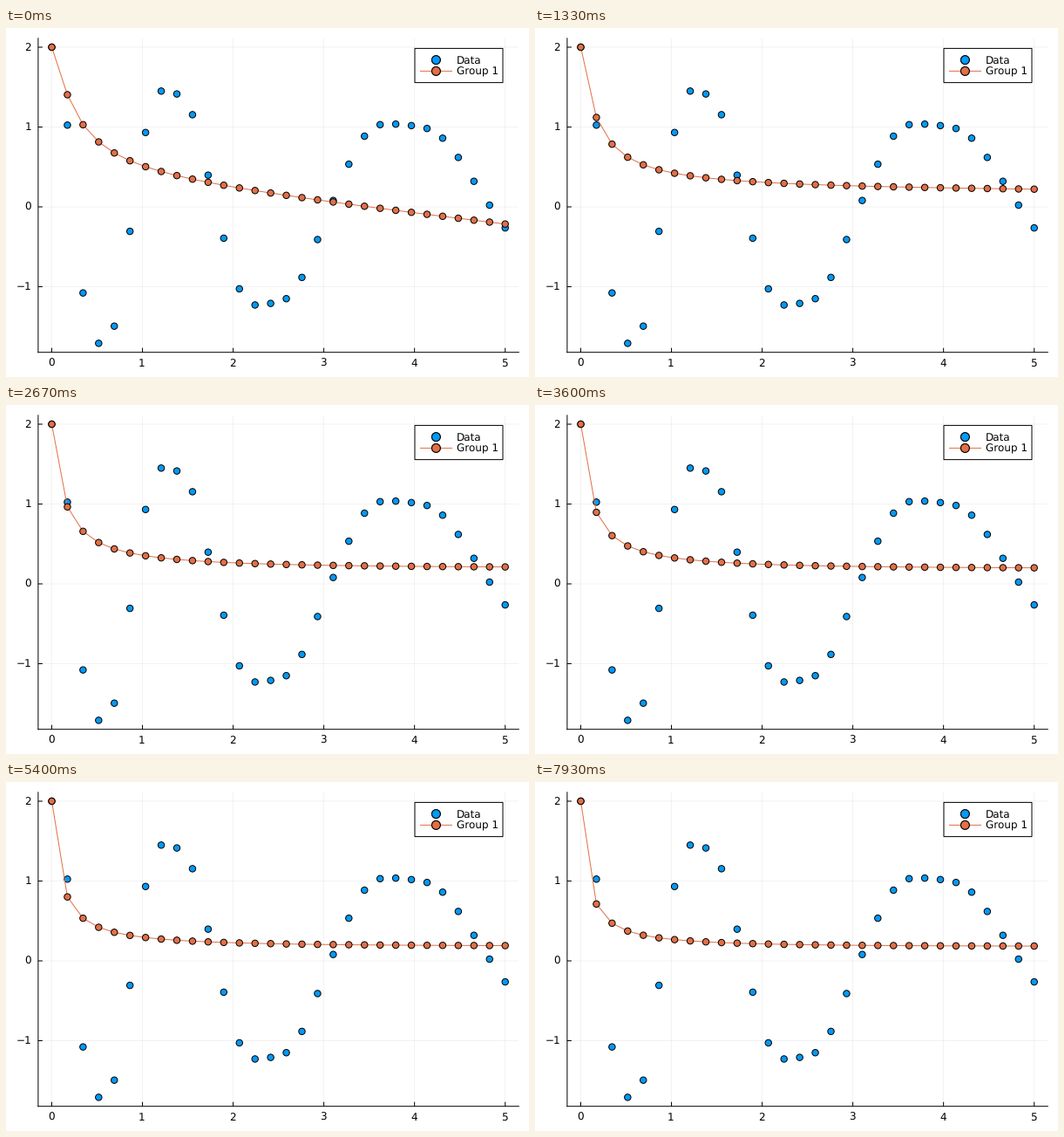
Write a matplotlib script that moves like this. It is 600x400 px and loops after 8 s.

```python
import numpy as np
import matplotlib.pyplot as plt
from matplotlib.animation import FuncAnimation
from matplotlib.patches import Rectangle

W, H, DPI = 600, 400, 100
FRAMES, LOOP_MS = 120, 8000
PX = 72 / DPI  # one pixel in points
BLUE, ORANGE = "#009afa", "#e36f47"
plt.rcParams.update({"font.family": "DejaVu Sans", "path.snap": False,
                     "text.hinting": "no_hinting"})

N = 30
x = np.linspace(0, 5, N)
steps = np.arange(N)


def spiral(substeps=40):
    """First coordinate of u' = A u^3 from (2, 0), by Runge-Kutta."""
    A = np.array([[-0.1, -2.0], [2.0, -0.1]])
    h = x[1] / substeps
    u = np.array([2.0, 0.0])
    out = [u[0]]
    for _ in range(N - 1):
        for _ in range(substeps):
            k1 = A @ u ** 3
            k2 = A @ (u + h / 2 * k1) ** 3
            k3 = A @ (u + h / 2 * k2) ** 3
            k4 = A @ (u + h * k3) ** 3
            u = u + h / 6 * (k1 + 2 * k2 + 2 * k3 + k4)
        out.append(u[0])
    return np.array(out)


def fit_at(t):
    """Decay from 2 onto a straight tail that settles as training goes on."""
    rate = 0.558 + 0.0392 * t ** 0.793
    power = 1.05 + 0.25 * np.exp(-t / 15)
    level = 0.147 + 0.253 * np.exp(-t / 13.3)
    slope = (0.003 - 0.133 * np.exp(-(t / 13.5) ** 3)
             - 0.018 * np.exp(-((t - 29) / 5) ** 2))
    return level + slope * x + (2 - level) / (1 + rate * steps ** power)


def dots(ax, xs, ys, color, diameter, z):
    # One colour per dot keeps sub-pixel positions
    return ax.scatter(xs, ys, s=(diameter * PX) ** 2, c=[color] * len(xs),
                      edgecolors=["black"] * len(xs), linewidths=PX,
                      zorder=z, clip_on=False)


fig = plt.figure(figsize=(W / DPI, H / DPI), dpi=DPI, facecolor="white")

# Plot area
left, right, top, bottom = 36.9, 588.3, 11.8, 371.7
ax = fig.add_axes([left / W, 1 - bottom / H,
                   (right - left) / W, (bottom - top) / H])
ax.set_xlim(-0.15, 5.15)
ax.set_ylim(-1.8213, 2.1113)
ax.set_xticks(range(6))
ax.set_yticks(range(-1, 3))
ax.tick_params(length=0, labelbottom=False, labelleft=False)
ax.grid(color="black", alpha=0.1, linewidth=0.5 * PX)
ax.set_axisbelow(True)
for side in ("top", "right"):
    ax.spines[side].set_visible(False)
for side in ("left", "bottom"):
    ax.spines[side].set_linewidth(PX)

dots(ax, x, spiral(), BLUE, 7.4, 3)
line, = ax.plot(x, fit_at(0), color=ORANGE, lw=PX, zorder=4)
fit_dots = dots(ax, x, fit_at(0), ORANGE, 7.4, 5)

# Ticks, labels and legend, in pixels
page = fig.add_axes([0, 0, 1, 1])
page.set_xlim(0, W)
page.set_ylim(H, 0)
page.axis("off")


def label(px, py, text, ha="left"):
    page.text(px, py, text, fontsize=12 * PX, ha=ha, va="baseline", zorder=5)


def stroke(xs, ys, color="black"):
    page.plot(xs, ys, color=color, lw=PX, zorder=3, solid_capstyle="butt")


for n in range(6):
    px = 52.5 + 104.04 * n
    stroke([px, px], [bottom, bottom - 5])
    label(px - 0.6, 387.5, str(n), ha="center")
for n in range(-1, 3):
    py = 205 - 91.5 * n
    stroke([left, left + 5], [py, py])
    label(29.2, py + 3.9, str(n).replace("-", "\u2212"), ha="right")

page.add_patch(Rectangle((469, 23.4), 101, 39.2, facecolor="white",
                         edgecolor="black", linewidth=PX, zorder=2))
stroke([475, 512], [49.4, 49.4], ORANGE)
for py, color, text in ((36.6, BLUE, "Data"), (49.4, ORANGE, "Group 1")):
    dots(page, [493.4, 493.4], [py, py], color, 9.8, 4)
    label(516.6, py + 4.4, text)


def update(frame):
    y = fit_at(frame)
    line.set_ydata(y)
    fit_dots.set_offsets(np.column_stack([x, y]))
    return line, fit_dots


anim = FuncAnimation(fig, update, frames=FRAMES, interval=LOOP_MS / FRAMES,
                     repeat=True, repeat_delay=0)
plt.show()
```
